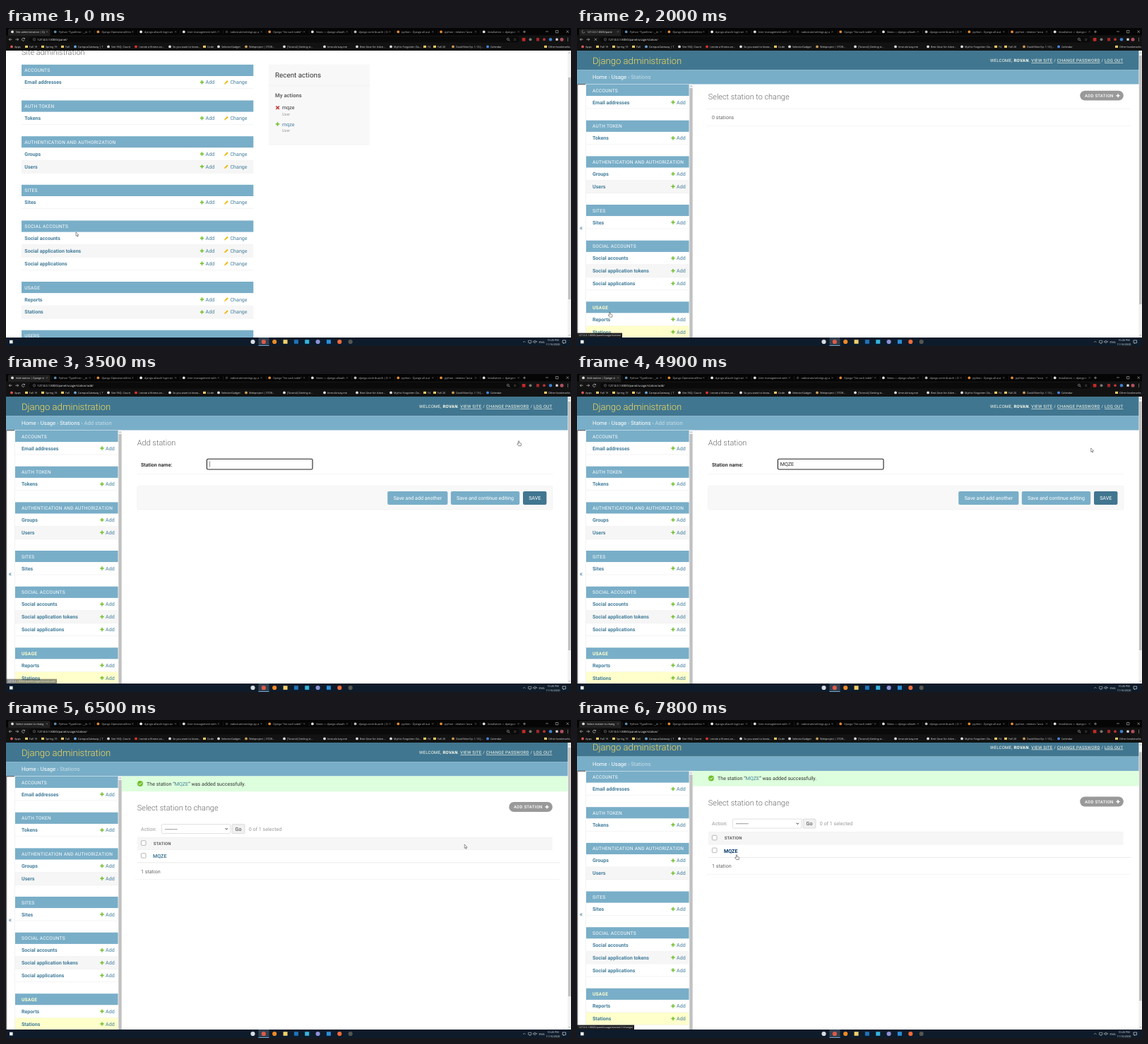
Animation, 800 px wide and 450 px high, one loop 7900 ms. Source, as an HTML page:

```html
<!DOCTYPE html>
<html lang="en">
<head>
<meta charset="utf-8">
<title>Station setup</title>
<style>
html, body { margin: 0; width: 100%; height: 100%; overflow: hidden; background: #fff; }
svg { display: block; width: 800px; height: 450px; }
text { font-family: Roboto, sans-serif; text-rendering: geometricPrecision; white-space: pre; }
.ui text { font-family: "Open Sans", "Noto Sans", sans-serif; }
.b { font-weight: 700; }
.l { font-weight: 300; }
.caps { letter-spacing: .27px; }
.u { text-decoration: underline; text-decoration-color: #ffffff60; }
</style>
</head>
<body>
<svg id="stage" viewBox="0 0 800 450"></svg>
<script>
const BLUE = '#79aec8', DARK = '#417690', LINK = '#447e9b', GREEN = '#70bf2b';
const STATION = 'MQZE', HOST = '127.0.0.1:8000/panel/', LIST = HOST + 'usage/station/';
const LOOP = 7900, STEP = 100;

const rect = (x, y, w, h, fill, more = '') =>
  `<rect x="${x}" y="${y}" width="${w}" height="${h}" fill="${fill}" ${more}/>`;
const dot = (x, y, r, fill, more = '') =>
  `<circle cx="${x}" cy="${y}" r="${r}" fill="${fill}" ${more}/>`;
const path = (d, stroke, width = .6, more = '') =>
  `<path d="${d}" fill="none" stroke="${stroke}" stroke-width="${width}" ${more}/>`;
// y is the middle of the capitals
const text = (x, y, s, size = 7.1, fill = '#666', more = '') =>
  `<text x="${x}" y="${y + size * .355}" font-size="${size}" fill="${fill}" ${more}>${s}</text>`;
const span = (s, more) => `<tspan ${more}>${s}</tspan>`;
const group = (id, s, more = '') => `<g id="${id}" ${more}>${s}</g>`;
const rule = (x, y, w, fill = '#eee') => rect(x, y, w, .6, fill);
const plus = (x, y, c = GREEN, r = 2.7) =>
  path(`M${x - r} ${y}h${2 * r}M${x} ${y - r}v${2 * r}`, c, 1.5);
const pencil = (x, y) =>
  path(`M${x - 1.6} ${y + 1.6}l3.6 -3.6`, '#efb80b', 2) +
  `<path d="M${x - 2.9} ${y + 2.9}l.5 -2 1.5 1.5z" fill="#efb80b"/>`;

const MODULES = [
  ['ACCOUNTS', 'Email addresses'],
  ['AUTH TOKEN', 'Tokens'],
  ['AUTHENTICATION AND AUTHORIZATION', 'Groups', 'Users'],
  ['SITES', 'Sites'],
  ['SOCIAL ACCOUNTS', 'Social accounts', 'Social application tokens', 'Social applications'],
  ['USAGE', 'Reports', 'Stations'],
  ['USERS', 'Users'],
];

function modules(x, w, textX, addX, top, nav) {
  let out = '', y = top;
  for (const [name, ...rows] of MODULES) {
    const current = nav && name === 'USAGE';
    out += rect(x, y, w, 16.2, BLUE) +
      text(textX, y + 8.2, name, 6.56, current ? '#ffc' : '#fff', `class="caps ${current ? 'b' : ''}"`);
    y += 16.4;
    rows.forEach((row, i) => {
      const mid = y + 8.6, station = row === 'Stations';
      out += rect(x, y, w, 17.9, nav && station ? '#ffc' : i % 2 ? '#f6f6f6' : '#fff') +
        rule(x, y + 17.3, w) +
        text(textX, mid, row, 7.1, LINK, `class="b" ${!nav && station ? 'id="stationLink"' : ''}`) +
        plus(addX, mid) + text(addX + 5, mid, 'Add', 7.1, LINK);
      if (!nav) out += pencil(addX + 34.5, mid) + text(addX + 40, mid, 'Change', 7.1, LINK);
      y += 17.9;
    });
    y += 16.4;
  }
  return out;
}

function indexPage() {
  const user = STATION.toLowerCase();
  return text(22, 34.2, 'Site administration', 10.9, '#666', 'class="l"') +
    modules(22, 328.3, 26.3, 277.5, 51.8) +
    rect(372, 51.6, 143, 114.4, '#f8f8f8') +
    text(381, 66.3, 'Recent actions', 9.85, '#333') + rule(372, 80.8, 143, '#eaeaea') +
    text(381, 95, 'My actions', 7.66, '#666', 'class="b"') +
    path('M382.4 110.6l4.4 4.4m0-4.4l-4.4 4.4', '#c33', 1.5) +
    text(391, 112.8, user, 7.1, '#333') + text(391, 121.8, 'User', 5.5, '#999') +
    plus(384.5, 136) + text(391, 136.2, user, 7.1, LINK) + text(391, 145.2, 'User', 5.5, '#999');
}

function shell() {
  const u = s => span(s, 'class="u"');
  return rect(0, 32, 796, 27.2, DARK) + rect(0, 59.2, 796, 20.3, BLUE) +
    text(22, 46, 'Django administration', 13.1, '#f5dd5d', 'class="l"') +
    text(773.3, 46, `WELCOME, ${span('ROVAN', 'class="b"')}. ${u('VIEW SITE')} / ${u('CHANGE PASSWORD')} / ${u('LOG OUT')}`,
      6, '#ffe', 'class="caps" text-anchor="end"') +
    text(22, 69.5, '', 7.66, '#c4dce8', 'id="crumbs"') +
    path('M12 79.8H.7V460', '#222', .8) + rect(12.2, 79.5, .6, 400, '#eaeaea') +
    text(3.6, 282, '«', 10, LINK) +
    modules(13, 145.6, 22, 136, 80, true) +
    rect(159, 79.5, 5, 400, '#f1f1f1') + rect(159.4, 85, 4.2, 400, '#c1c1c1') +
    path('M160.4 83l1.1-1.2 1.1 1.2', '#777');
}

const addButton = (y, id) =>
  rect(712.2, y - 6.9, 61.6, 13.8, '#999', `rx="6.9" id="${id}"`) +
  text(719, y, 'ADD STATION', 6, '#fff', 'class="caps" font-weight="500"') + plus(766, y, '#fff', 2.5);

const heading = (y, s) => text(185.8, y, s, 10.9, '#666', 'class="l"');

const emptyList = () => heading(97, 'Select station to change') + addButton(95.7, 'addButton') +
  rule(183, 114, 601) + text(191, 126.2, '0 stations') + rule(183, 138, 601);

function addForm() {
  const button = (x, w, s, fill, more = '') => rect(x, 166, w, 19, fill, `rx="2.2" ${more}`) +
    text(x + w / 2, 175.4, s, 7.1, '#fff', 'text-anchor="middle"');
  return heading(97, 'Add station') + text(191, 128.5, 'Station name:', 7.1, '#333', 'class="b"') +
    rect(284.4, 120.2, 149.6, 14.8, '#fff', 'rx="1.8" id="field"') +
    text(287.8, 127.6, '', 7.1, '#222', 'id="typed"') + rect(288, 123.4, .5, 8.4, '#222', 'id="caret"') +
    rule(186, 141, 588) + rect(185.8, 158.4, 588, 33.6, '#f8f8f8', 'stroke="#eee" stroke-width=".6" rx="2"') +
    button(540.2, 85.2, 'Save and add another', BLUE) +
    button(629.8, 97.4, 'Save and continue editing', BLUE) +
    button(732, 33.4, 'SAVE', DARK, 'id="save"');
}

function fullList() {
  const box = (x, y, w, h, fill = '#fff', c = '#ccc') =>
    rect(x, y, w, h, fill, `rx="1.2" stroke="${c}" stroke-width=".6"`);
  const check = y => box(191.4, y - 3.4, 6.6, 6.6, '#fff', '#888');
  return rect(164, 79.5, 632, 21.6, '#dfd') + dot(190, 90, 3.9, GREEN) +
    path('M188 90l1.5 1.6 2.7-3', '#fff', 1) +
    text(199, 90.2, `The station “${span(STATION, `fill="${LINK}"`)}” was added successfully.`, 7.1, '#333') +
    heading(124.3, 'Select station to change') + addButton(123, 'addButton2') +
    text(191, 154.2, 'Action:', 7.1, '#999') + box(220.4, 147.6, 97.4, 13) +
    text(225, 154, '---------', 7.1, '#222') + path('M310.6 153.2l1.7 1.8 1.7-1.8', '#222', .9) +
    box(320, 147.6, 18, 13, '#f1f1f1') + text(329, 154.2, 'Go', 7.1, '#333', 'text-anchor="middle"') +
    text(343.8, 154, '0 of 1 selected', 7.1, '#999') +
    rect(186, 166, 587.5, 17.6, '#f6f6f6') + rule(186, 166, 587.5) + rule(186, 183.2, 587.5) +
    check(174.2) + text(208.8, 174.8, 'STATION', 6, '#666', 'class="b"') +
    check(192) + text(208, 192.6, STATION, 7.1, LINK, 'class="b" id="row"') +
    rule(186, 201.6, 598, '#ddd') + text(191, 214, '1 station') + rule(183, 225.4, 601);
}

const TABS = ['', 'Python "TypeError: __in', 'Django OperationalErro', 'django-allauth login wi', 'User management with',
  'radiostats/settings.py a', 'Django "No such table"', 'Views — django-allauth', 'django.contrib.auth | D',
  'python - Django all-aut', 'python - relation "acco', 'Installation — django-r'];
const TAB_ICONS = ['#ddd', '#5b8bb0', '#e08a3a', '#eee', '#ddd', '#333', '#e08a3a', '#ddd', '#bbb', '#e08a3a', '#e08a3a', '#ddd'];
const FOLDER = '#e8c860';
const BOOKMARKS = [[12, 'Apps', '#d55'], [33, 'Fall 19', FOLDER], [56, 'Spring 19', FOLDER], [84, 'Fall', FOLDER],
  [102, 'CampusGateway | T', '#6aa5d8'], [149, 'Site FAQ: Count', '#ddd'], [188, 'I wrote a fitness an...', '#d33'],
  [236, 'So you want to know...', '#ddd'], [285, 'Code', FOLDER], [305, 'SelectorGadget', '#ddd'],
  [344, 'Webproject | STOR...', '#c9a05a'], [398, '[Tutorial] Getting st...', '#ddd'], [455, 'time.okrivay.me', '#ddd'],
  [501, 'Best Gear for Adve...', '#ddd'], [549, 'Mythic Forgotten Oa...', '#ddd'], [597, 'F4', FOLDER],
  [611, 'Fall 20', FOLDER], [637, 'Dusk/Nine Ep. 1-13 [...', '#c95'], [686, 'Calendar', '#4a86e8'], [768, 'Other bookmarks', FOLDER]];

function browser() {
  let out = rect(0, 0, 800, 32, '#050505') + rect(0, 10.4, 800, 21.6, '#121212') +
    rect(3, 1.2, 59.5, 10, '#202020', 'rx="1.5"') + rect(33, 12.2, 694, 8.2, '#0a0a0a', 'rx="4"');
  TABS.forEach((s, i) => {
    const x = 14 + 60.7 * i;
    out += dot(x - 5, 5.4, 1.9, TAB_ICONS[i], i ? '' : 'id="tabIcon"') +
      text(x, 5.4, s, 3.75, i ? '#bbb' : '#eee', i ? '' : 'id="tabTitle"') +
      path(`M${x + 43} 4.4l2 2m0-2l-2 2`, '#aaa', .4);
    if (i) out += rect(x - 10, 3, .3, 5, '#444');
  });
  out += path('M732 5.4h4m-2-2v4M764 5h4M778.5 3.5h3.4v3.4h-3.4zM793.5 3.5l3.4 3.4m0-3.4l-3.4 3.4', '#ddd', .5) +
    path('M8.5 16.2h-4.2l1.8-1.8m-1.8 1.8l1.8 1.8M13.4 16.2h4.2l-1.8-1.8m1.8 1.8l-1.8 1.8', '#ddd') +
    path('M26.2 15.2a2 2 0 1 0 .1 1.9M26.4 13.9v1.5h-1.5', '#ddd', .6, 'id="reload"') +
    path('M24.8 14.6l3.2 3.2m0-3.2l-3.2 3.2', '#ddd', .6, 'id="stop"') +
    dot(40, 16.2, 1.8, 'none', 'stroke="#aaa" stroke-width=".4"') + path('M40 15.9v1.2M40 15v.4', '#aaa', .4) +
    text(44.5, 16.2, '', 4.2, '#eee', 'id="url"') +
    dot(710.8, 15.8, 1.5, 'none', 'stroke="#ccc" stroke-width=".5"') + path('M712 17l1.4 1.4', '#ccc') +
    text(718.4, 16.3, '☆', 5, '#ccc') +
    rect(730.8, 14, 4.6, 4.6, '#c62828') + dot(742.5, 16.2, 2, '#777') + rect(751, 14, 4, 4.4, '#a3262a') +
    dot(762, 16.2, 1.9, '#b33') + dot(771, 16.2, 2.3, '#3d7fd0') + rect(778.4, 14.6, 3.2, 3.2, '#ddd') +
    dot(787, 16.2, 2.5, '#b05060') + [14.4, 16.2, 18].map(y => dot(795.5, y, .5, '#ccc')).join('');
  for (const [x, s, c] of BOOKMARKS) {
    out += (c === FOLDER ? rect(x - 6, 24.8, 4, 3.2, c) : dot(x - 4, 26.4, 1.9, c)) + text(x, 26.4, s, 3.75, '#ddd');
  }
  return out;
}

function taskbar() {
  const icons = ['#d8dbe0', '#dd5a48', '#f08a24', '#f2d06b', '#2173b8', '#35b5dd', '#8c91d8', '#2a8fd8', '#f26b3a', '#55564f'];
  const square = [3, 4, 5, 7];
  let out = rect(0, 438, 800, 12, '#0d1b2a') + rect(5, 441.8, 4.6, 4.6, '#eee') +
    rect(357.5, 438, 15, 12, '#324150') + rect(357.5, 449.2, 15, .8, '#76b9ed');
  icons.forEach((c, i) => {
    const x = 349.5 + 15.35 * i;
    out += square.includes(i) ? rect(x - 3, 441.2, 6, 5.6, c) : dot(x, 444, 3.1, c);
  });
  return out + path('M732 445l1.8-1.8 1.8 1.8M739.5 442.4h4.4v3h-4.4zM741 446.6h1.6M746.6 443.2h1.2l1.4-1.2v4l-1.4-1.2h-1.2zM750.2 442.8l1.6 2m0-2l-1.6 2', '#ddd', .5) +
    text(754.6, 444.2, 'ENG', 3.9, '#eee') +
    text(774.5, 441.3, '10:26 PM', 3.75, '#eee', 'text-anchor="middle"') +
    text(774.5, 447.2, '11/16/2020', 3.75, '#eee', 'text-anchor="middle"') +
    path('M788 442h4.6v3.6h-2l-1 1.2v-1.2h-1.6z', '#eee', .6);
}

const cursors =
  `<path id="arrow" d="M0 0v5.4l1.2-1.1.9 2 .9-.4-.9-1.9h1.8z" fill="#fff" stroke="#000" stroke-width=".4"/>` +
  `<path id="hand" d="M-.7 .4a.7.7 0 0 1 1.4 0v2.1l2 .5q.9.3.8 1.2l-.4 2.4h-3.4l-2-2.7q.4-.9 1.6 0z" fill="#fff" stroke="#000" stroke-width=".45"/>`;

const stage = document.getElementById('stage');
stage.innerHTML = rect(0, 0, 800, 450, '#fff') +
  group('index', indexPage()) +
  group('page', shell() + group('empty', emptyList()) + group('form', addForm()) + group('full', fullList())) +
  rect(795.4, 32, 4.6, 406, '#f1f1f1') + rect(796, 0, 3.6, 10, '#c1c1c1', 'id="thumb"') +
  path('M796.6 36l1.1-1.3 1.1 1.3M796.6 434l1.1 1.3 1.1-1.3', '#777', .5) +
  group('status', rect(0, 431.6, 0, 6.4, '#1c1d20', 'id="statusBox"') + text(2, 434.9, '', 3.6, '#eee', 'id="statusText"'), 'class="ui"') +
  group('browser', browser(), 'class="ui"') + group('taskbar', taskbar(), 'class="ui"') +
  group('cursor', cursors);

const el = {};
stage.querySelectorAll('[id]').forEach(n => el[n.id] = n);
const show = (id, on) => el[id].setAttribute('display', on ? 'inline' : 'none');
const set = (id, attrs) => { for (const k in attrs) el[id].setAttribute(k, attrs[k]); };

const MOVES = [[0, 99, 289], [100, 99, 289], [1000, 46.5, 402.5], [2100, 46.5, 402.5], [3000, 726, 95],
  [4700, 726, 95], [5600, 739, 173], [6250, 739, 173], [7200, 215, 191], [7400, 215, 191], [7700, 226, 191], [LOOP, 226, 191]];

function cursorAt(t) {
  const i = MOVES.findIndex(m => m[0] > t);
  const [t0, x0, y0] = MOVES[i - 1], [t1, x1, y1] = MOVES[i];
  const p = (t - t0) / (t1 - t0), e = p * p * (3 - 2 * p);
  return [x0 + (x1 - x0) * e, y0 + (y1 - y0) * e];
}

function draw(t) {
  const within = (a, b) => t >= a && t < b;
  const view = t < 1900 ? 'index' : t < 3400 ? 'empty' : t < 6100 ? 'form' : 'full';
  const scroll = t >= 7800 ? 7.5 : t >= 7700 ? 2 : 0;

  show('index', view === 'index');
  show('page', view !== 'index');
  for (const id of ['empty', 'form', 'full']) show(id, view === id);
  set('page', { transform: `translate(0 ${-scroll})` });
  set('thumb', view === 'index' ? { y: 70, height: 314 } : { y: 39 + scroll * .85, height: 352 });

  const white = s => span(s, 'fill="#fff"');
  el.crumbs.innerHTML = white('Home') + ' › ' + white('Usage') + ' › ' +
    (view === 'form' ? white('Stations') + ' › Add station' : 'Stations');
  el.tabTitle.textContent = view === 'index' ? 'Site administration | Dj' : t < 2100 ? HOST.slice(0, 19) :
    view === 'form' ? 'Add station | Django si' : 'Select station to chang';
  el.url.textContent = view === 'index' ? HOST : view === 'form' ? LIST + 'add/' : LIST;

  const loading = within(1800, 2100) || within(3300, 3400) || within(5800, 6100);
  show('stop', loading);
  show('reload', !loading);
  set('tabIcon', loading ? { fill: 'none', stroke: '#9ab', 'stroke-width': .6, 'stroke-dasharray': '8 4' } :
    { fill: '#ddd', stroke: 'none' });

  set('stationLink', { fill: t >= 900 ? '#036' : LINK });
  set('addButton', { fill: t >= 2900 ? DARK : '#999' });
  set('row', { fill: t >= 7200 ? '#036' : LINK });

  const focus = t < 5800;
  el.typed.textContent = STATION.slice(0, [4000, 4200, 4300, 4500].filter(k => t >= k).length);
  set('field', focus ? { stroke: '#222', 'stroke-width': 1.1 } : { stroke: '#ddd', 'stroke-width': .6 });
  set('caret', { x: 288.2 + (view === 'form' ? el.typed.getComputedTextLength() : 0) });
  show('caret', focus && (t - 3400) % 1000 < 500);
  set('save', { fill: t >= 5500 ? '#205067' : DARK, stroke: focus ? 'none' : '#111', 'stroke-width': 1.1 });

  const [link, width] = t < 2800 ? [LIST, 64] : t < 5000 ? [LIST + 'add/', 72] : [LIST + '1/change/', 81];
  const alpha = within(1000, 2200) || within(3000, 3500) || t >= 7400 ? 1 : t === 3500 || t === 7300 ? .5 : 0;
  el.statusText.textContent = link;
  set('statusBox', { width });
  set('status', { opacity: alpha });

  const hand = within(900, 2200) || within(2900, 4800) || within(5500, 6400) || t >= 7100;
  show('hand', hand);
  show('arrow', !hand);
  set('cursor', { transform: `translate(${cursorAt(t)})` });
}

let start;
function tick(now) {
  start ??= now;
  draw(Math.floor((now - start) % LOOP / STEP) * STEP);
  requestAnimationFrame(tick);
}
draw(0);
requestAnimationFrame(tick);
</script>
</body>
</html>
```
